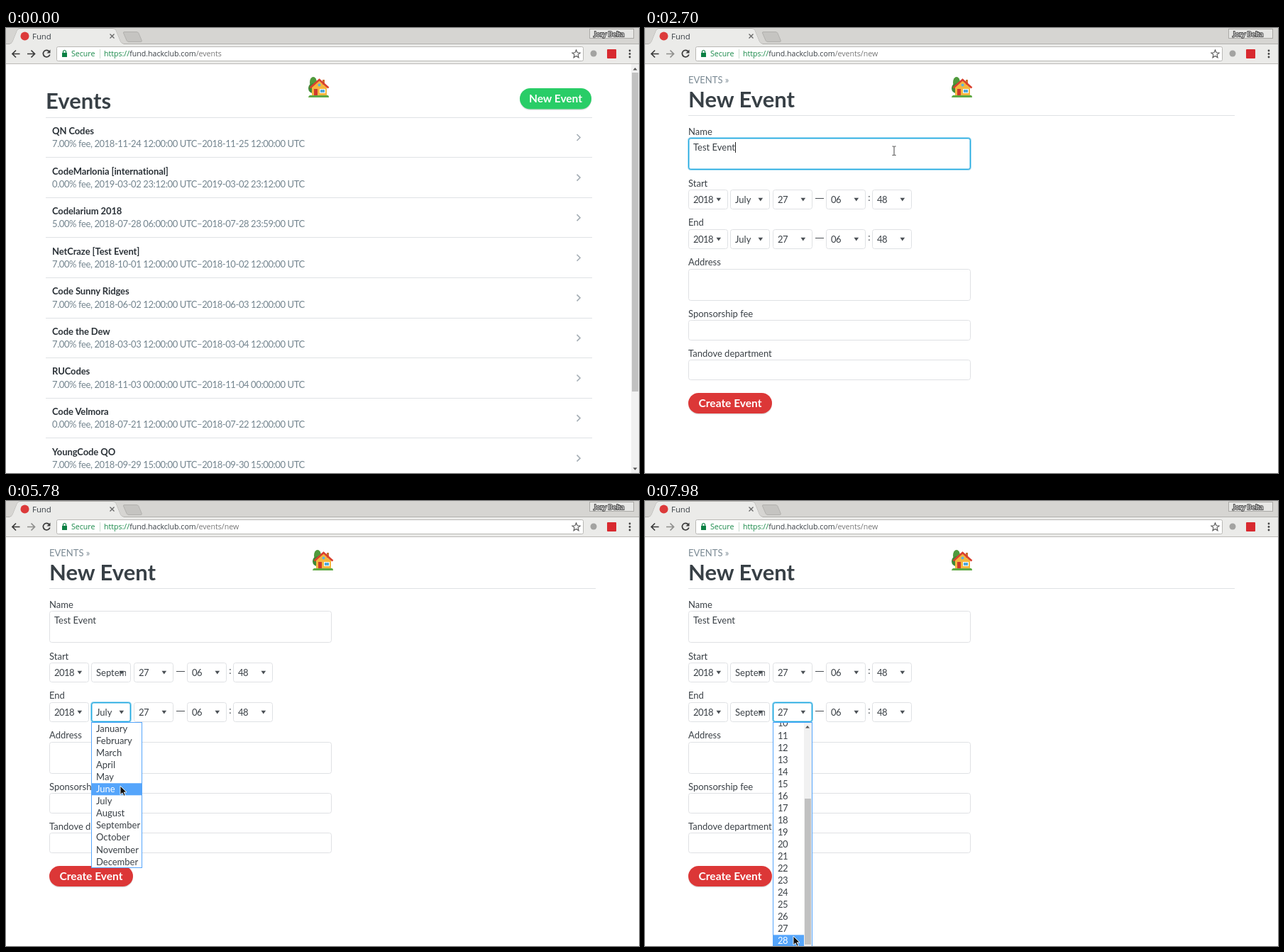
Recreate the animation shown at these times as an HTML page. Size 892 px wide and 628 px high, loop 8000 ms.

```html
<!DOCTYPE html>
<html lang="en">
<head>
<meta charset="utf-8">
<title>Events</title>
<style>
html, body { margin: 0; width: 100%; height: 100%; overflow: hidden; background: #fff; }
svg { display: block; }
text { font: 13px Lato, sans-serif; fill: #3a4046; white-space: pre; }
.ui, .ui tspan { font: 10.6px "Open Sans", "Noto Sans", sans-serif; }
.tab { font-size: 11.4px; }
.badge { font-size: 9.6px; fill: #fff; stroke: #4a4a4a; stroke-width: 2px; paint-order: stroke; }
.h1 { font-size: 31px; font-weight: 700; fill: #384046; }
.title { font-weight: 700; fill: #2b3238; letter-spacing: -.1px; }
.meta { fill: #74858f; letter-spacing: -.4px; }
.crumb { fill: #7b8a94; }
.num { letter-spacing: -.5px; }
.btn { font-size: 15.5px; font-weight: 700; fill: #fff; text-anchor: middle; }
.icon { fill: none; stroke: #3b3b3b; stroke-width: 1.7; }
</style>
</head>
<body>
<svg id="stage" width="892" height="628" viewBox="0 0 892 628"></svg>
<script>
const LOOP = 8000, PITCH = 17.05, BLUE = '#55a5fb', INK = '#3a4046';
const HOST = 'fund.hackclub.com';
const MONTHS = ['January', 'February', 'March', 'April', 'May', 'June', 'July',
  'August', 'September', 'October', 'November', 'December'];
const DAYS = Array.from({ length: 31 }, (_, i) => i + 1);
const EVENTS = [
  ['QN Codes', '7.00', '2018-11-24 12:00:00', '2018-11-25 12:00:00'],
  ['CodeMarlonia [international]', '0.00', '2019-03-02 23:12:00', '2019-03-02 23:12:00'],
  ['Codelarium 2018', '5.00', '2018-07-28 06:00:00', '2018-07-28 23:59:00'],
  ['NetCraze [Test Event]', '7.00', '2018-10-01 12:00:00', '2018-10-02 12:00:00'],
  ['Code Sunny Ridges', '7.00', '2018-06-02 12:00:00', '2018-06-03 12:00:00'],
  ['Code the Dew', '7.00', '2018-03-03 12:00:00', '2018-03-04 12:00:00'],
  ['RUCodes', '7.00', '2018-11-03 00:00:00', '2018-11-04 00:00:00'],
  ['Code Velmora', '0.00', '2018-07-21 12:00:00', '2018-07-22 12:00:00'],
  ['YoungCode QO', '7.00', '2018-09-29 15:00:00', '2018-09-30 15:00:00']
];

// Drawing helpers
const text = (x, y, s, cls = '', extra = '') => `<text x="${x}" y="${y}" class="${cls}" ${extra}>${s}</text>`;
const rect = (x, y, w, h, fill, extra = '') =>
  `<rect x="${x}" y="${y}" width="${w}" height="${h}" fill="${fill}" ${extra}/>`;
const path = (d, extra = '') => `<path d="${d}" ${extra}/>`;
const group = (id, body, extra = '') => `<g id="${id}" ${extra}>${body}</g>`;
const pill = (x, y, w, h, color, label) =>
  rect(x, y + 1.5, w, h, '#000', `rx="${h / 2}" opacity=".12"`) +
  rect(x, y, w, h, color, `rx="${h / 2}"`) + text(x + w / 2, y + h / 2 + 5.4, label, 'btn');
const box = (x, y, w, h) => rect(x + .5, y + .5, w, h, '#fff', 'stroke="#dfe1e4" rx="3"');
const ring = (id, x, y, w, h) => group(id,
  rect(x + .5, y + .5, w, h, 'none', 'stroke="#67c4ec" stroke-width="3" rx="3" opacity=".55" class="glow"') +
  rect(x + .5, y + .5, w, h, 'none', 'stroke="#1fa9df" rx="3"'), 'opacity="0"');

const house = (x, y) => `<g transform="translate(${x} ${y})">` +
  rect(6, 18, 3, 9, '#8a5a34') +
  '<ellipse cx="7" cy="8" rx="5" ry="8" fill="#4f9a3c"/><ellipse cx="6.5" cy="16" rx="6.5" ry="7" fill="#3f8a36"/>' +
  path('M5 14L15 5L26 14V27H5Z', 'fill="#f4b63f"') +
  rect(20, 4, 3, 7, '#c9702d') +
  path('M2.5 15.5L15.5 4L28.5 15.5', 'fill="none" stroke="#d9402f" stroke-width="2.6"') +
  rect(8, 17, 5, 10, '#cf3a2c') + rect(16, 17, 8, 6, '#fff') + rect(17, 18, 6, 4, '#4fa9dc') +
  '<circle cx="15.5" cy="11.5" r="2" fill="#5bb3e0"/>' +
  path('M0 29Q1 25 5 26H25Q29 25 29 29Z', 'fill="#5fa944"') + '</g>';

const browser = () =>
  rect(0, 0, 892, 23, '#d6d5d2') + rect(0, 22, 892, 28, '#ebebe9') + rect(0, 50, 892, 1, '#bcbbb8') +
  path('M0 22.5H5Q8 22 9.5 19L16 3Q17.5 .5 20 .5H150Q153 .5 154.5 3L161 19Q163 22 166 22.5H892', 'fill="none" stroke="#b2b1ae"') +
  path('M5 23Q8 22 9.5 19L16 3Q17.5 1 20 1H150Q153 1 154.5 3L161 19Q163 22 166 23Z', 'fill="#ebebe9"') +
  path('M165.5 7Q165 5.5 167 5.5H184Q186 5.5 187 7.5L191 17Q192 19.5 190 19.5H173Q171 19.5 170 17.5Z', 'fill="#c5c4c1" stroke="#b2b1ae"') +
  '<circle cx="26.5" cy="11.5" r="6" fill="#dc3a3a"/>' +
  text(37, 15.6, 'Fund', 'ui tab') +
  path('M146.5 8.5l6 6m0-6l-6 6', 'stroke="#666" stroke-width="1.3"') +
  rect(822.5, 1.5, 62, 13, '#e7e7e5', 'stroke="#aaa9a6"') + text(829, 12, 'Jory Belta', 'ui badge') +
  path('M19.5 36.5H9M14 31.5L9 36.5L14 41.5', 'class="icon"') +
  path('M30 36.5H40.5M35.5 31.5L40.5 36.5L35.5 41.5', 'class="icon" id="forward"') +
  path('M61 33.2A4.8 4.8 0 1 0 61.8 37.5', 'class="icon"') + path('M62.5 30.5V35.5H57.5Z', 'fill="#3b3b3b"') +
  rect(71.5, 26.5, 742, 20, '#fff', 'stroke="#b9b8b5" rx="2"') +
  rect(79, 35, 7, 6, '#0b8043') + path('M80.5 35V33.5a2 2 0 0 1 4 0V35', 'fill="none" stroke="#0b8043" stroke-width="1.2"') +
  text(92, 40.3, 'Secure', 'ui', 'style="fill:#1b8a4b"') + rect(132, 30, 1, 13, '#c9dccf') +
  text(138, 40.3, `<tspan fill="#1b8a4b">https://</tspan>${HOST}<tspan id="tail" fill="#777"></tspan>`, 'ui') +
  path('M803.5 31l1.6 3.8 4 .3-3.1 2.6 1 4-3.5-2.2-3.5 2.2 1-4-3.1-2.6 4-.3Z', 'fill="none" stroke="#555" stroke-width="1.1"') +
  '<circle cx="828" cy="36" r="4.5" fill="#a3a3a1"/>' + rect(847, 30, 13, 13, '#d8292f', 'rx="1"') +
  [32, 36.5, 41].map(y => `<circle cx="879" cy="${y}" r="1.4" fill="#444"/>`).join('');

const listPage = () =>
  house(426, 69) + text(56, 114, 'Events', 'h1') + pill(724, 85, 101, 29.5, '#29cd67', 'New Event') +
  EVENTS.map(([name, fee, from, to], i) => {
    const y = 126 + 56.58 * i;
    return rect(56, Math.round(y - .3), 770, 1, '#dfe2e5') +
      text(65, y + 24, name, 'title') + text(65, y + 42.3, `${fee}% fee, ${from} UTC–${to} UTC`, 'meta') +
      path(`M804.5 ${y + 24}l4.5 4.5l-4.5 4.5`, 'fill="none" stroke="#a5aeb5" stroke-width="1.6"');
  }).join('') +
  rect(881, 51, 11, 577, '#f1f1f1') + rect(882, 63, 9, 450, '#c1c1c1') +
  path('M883.5 59.5h6l-3-3.5Z', 'fill="#555"') + path('M883.5 620.5h6l-3 3.5Z', 'fill="#555"') +
  group('status', path('M0 628V609H293Q296 609 296 612V628Z', 'fill="#dddcda" stroke="#cfcecc"') +
    text(2, 622.2, `https://${HOST}/events/new`, 'ui tab', 'style="fill:#666"'));

const select = (x, y, label, id = '') => box(x, y, 55, 27) +
  path(`M${x + 39.5} ${y + 11.7}h6.6l-3.3 4.8Z`, 'fill="#4a4f54"') +
  `<svg x="${x + 7}" y="${y}" width="42" height="28">${text(0, 18.6, label, id ? '' : 'num', id && `id="${id}"`)}</svg>`;

const dateRow = (y, id) =>
  select(61, y, '2018') + select(120, y, 'July', id) + select(180, y, '27') +
  rect(240, y + 12, 12, 1, '#4a4f54') + select(255, y, '06') +
  text(314.3, y + 16, ':') + select(320, y, '48');

const options = (items, x, y, cls) => rect(0, 0, 0, PITCH, BLUE, 'class="hi"') +
  items.map((s, i) => text(x, y + i * PITCH + 13, s, cls)).join('');

const monthMenu = (id, y) => group(id,
  rect(.5, .5, 71, 205, '#fff', `stroke="${BLUE}"`) + options(MONTHS, 7, 1, '') +
  (id === 'menuA' ? `<svg id="sliver" x="25" y="1" width="19" height="17">${rect(0, 0, 19, 17, BLUE)}${
    text(-18, 13, 'January', '', 'style="fill:#fff"')}</svg>` : ''),
  `transform="translate(120 ${y})"`);

const formPage = () =>
  house(432, 69) + text(61, 77.6, 'EVENTS »', 'crumb') + text(61, 112, 'New Event', 'h1') +
  rect(61, 123, 770, 1, '#dfe2e5') +
  [['Name', 150.6], ['Start', 223.6], ['End', 279.4], ['Address', 335.4], ['Sponsorship fee', 408.2],
    ['Tandove department', 464.2]].map(([s, y]) => text(61, y, s)).join('') +
  [[155, 44], [340, 44], [412, 28], [468, 28]].map(([y, h]) => box(61, y, 397, h)).join('') +
  dateRow(228, 'monthA') + dateRow(284, 'monthB') +
  pill(61, 515, 118, 29, '#dc3737', 'Create Event') +
  ring('ring0', 61, 155, 397, 44) + ring('ring1', 120, 228, 55, 27) +
  ring('ring2', 120, 284, 55, 27) + ring('ring3', 180, 284, 55, 27) +
  text(68, 173, '', '', 'id="typed"') + rect(0, 161, 1, 15, '#222', 'id="caret"') +
  monthMenu('menuA', 256) + monthMenu('menuB', 312) +
  rect(180, 313, 56, 315, '#fff', 'id="unpainted"') +
  `<svg id="menuC" x="180" y="312" width="56" height="316">${rect(.5, .5, 55, 340, '#fff', `stroke="${BLUE}"`)}${
    options(DAYS, 7, -160, 'num')}${rect(44, 1, 11, 316, '#f1f1f1')}${rect(45, 108, 9, 206, '#c1c1c1')}${
    path('M46 8.5h6l-3-3.5Z', 'fill="#555"')}${rect(0, 0, 56, 1, BLUE)}</svg>`;

const cursors = () => {
  const style = 'fill="#111" stroke="#fff" stroke-width=".9"';
  return group('cursor',
    path('M0 0V12.5L3 9.8L5 14.3L7.2 13.3L5.2 9H9Z', `id="arrow" ${style}`) +
    path('M-1.5 1Q0 -1 1.2 1V4.5L6 5.5Q7.5 6 7 8.5L6 13H-.5L-4 8.5Q-4 6.5-1.5 8Z', `id="hand" ${style}`) +
    path('M-2.5-6H-.5L0-5.5L.5-6H2.5M0-5.5V6M-2.5 6.5H-.5L0 6L.5 6.5H2.5', 'id="beam" fill="none" stroke="#444"'));
};

document.getElementById('stage').innerHTML =
  rect(0, 0, 892, 628, '#fff') + group('list', listPage()) + group('form', formPage()) + browser() + cursors();

const $ = id => document.getElementById(id);
const show = (id, on) => { $(id).style.display = on ? '' : 'none'; };
const clamp = v => Math.max(0, Math.min(1, v));

// Pointer stops: time, x, y
const STOPS = [
  [400, 435, 97], [600, 590, 72], [840, 756, 90], [1160, 756, 90], [1610, 351, 173], [3050, 351, 173],
  [3700, 151, 241], [3880, 150, 244], [3920, 148, 263], [4360, 158, 399], [4690, 158, 399],
  [5000, 188, 275], [5170, 182, 281], [5310, 182, 281], [5480, 160, 300], [5600, 160, 301],
  [5900, 162, 455], [6360, 162, 455], [6720, 211, 302], [7140, 211, 304], [7940, 210, 612], [7980, 209, 614]
];
const SWAP = 1140, FOCUS = [1610, 3770, 5540, 6745], FADE = 120;
const KEYS = [1960, 2030, 2100, 2170, 2230, 2380, 2460, 2540, 2620, 2700];

function pointer(t) {
  const i = STOPS.findIndex(s => s[0] > t);
  if (i < 0) return STOPS[STOPS.length - 1].slice(1);
  if (i === 0) return STOPS[0].slice(1);
  const [t0, x0, y0] = STOPS[i - 1], [t1, x1, y1] = STOPS[i];
  const p = (t - t0) / (t1 - t0), e = p * p * (3 - 2 * p);
  return [x0 + (x1 - x0) * e, y0 + (y1 - y0) * e];
}

function highlight(id, index, x, width, top) {
  const menu = $(id), hi = menu.querySelector('.hi');
  hi.setAttribute('x', x);
  hi.setAttribute('width', width);
  hi.setAttribute('y', top + index * PITCH);
  [...menu.children].filter(n => n.tagName === 'text')
    .forEach((n, i) => { n.style.fill = i === index ? '#fff' : INK; });
}

function render(t) {
  const [x, y] = pointer(t), form = t >= SWAP;
  show('list', !form);
  show('form', form);
  show('status', t >= 1000);
  $('tail').textContent = form ? '/events/new' : '/events';
  $('forward').style.stroke = form ? '#8f8f8d' : '#3b3b3b';

  const overButton = !form && x > 724 && y > 85;
  const overName = form && x > 61 && x < 458 && y > 155 && y < 200;
  show('cursor', t >= 400);
  show('hand', overButton);
  show('beam', overName);
  show('arrow', !overButton && !overName);
  $('cursor').setAttribute('transform', `translate(${Math.round(x)} ${Math.round(y)})`);

  FOCUS.forEach((at, i) => {
    const enter = clamp((t - at) / FADE), leave = clamp((t - FOCUS[i + 1]) / FADE || 0);
    const r = $('ring' + i);
    r.setAttribute('opacity', leave ? .45 * (1 - leave) : Math.min(1, enter * 2.5));
    r.querySelector('.glow').setAttribute('opacity', .6 * enter);
  });

  $('typed').textContent = 'Test Event'.slice(0, KEYS.filter(k => t >= k).length);
  show('caret', t >= FOCUS[0] && t < FOCUS[1]);
  if (form) $('caret').setAttribute('x', Math.round(68 + $('typed').getComputedTextLength()));

  show('sliver', t >= 3900 && t < 3950);
  show('menuA', t >= 3790 && t < 4700);
  highlight('menuA', t < 3950 ? 6 : Math.max(0, Math.floor((y - 257) / PITCH)), 1, 70, 1);
  show('menuB', t >= 5570 && t < 6370);
  highlight('menuB', y < 313 ? 6 : Math.floor((y - 313) / PITCH), 1, 70, 1);
  $('monthA').textContent = t < 4700 ? 'July' : 'September';
  $('monthB').textContent = t < 6370 ? 'July' : 'September';

  show('unpainted', t >= 6765 && t < 6840);
  show('menuC', t >= 6840);
  highlight('menuC', y < 313 ? 26 : Math.floor((y - 305.5) / PITCH) + 9, 1, 43, -160);
}

const start = performance.now();
function tick() {
  render((performance.now() - start) % LOOP);
  requestAnimationFrame(tick);
}
tick();
</script>
</body>
</html>
```
